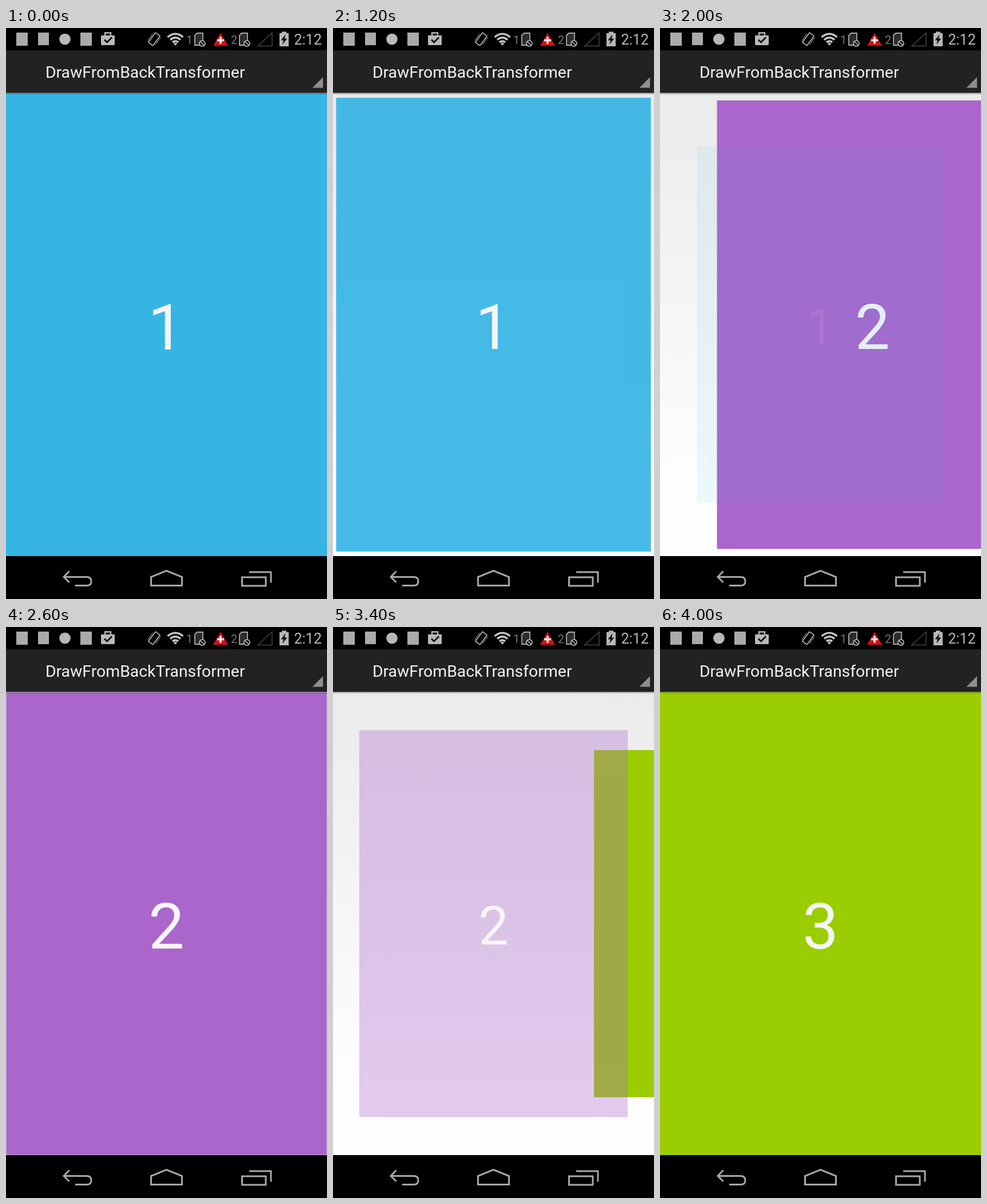
Recreate the animation shown at these times as an HTML page. Size 561 px wide and 998 px high, loop 4200 ms.

```html
<!DOCTYPE html>
<html lang="en">
<head>
<meta charset="utf-8">
<title>DrawFromBackTransformer</title>
<style>
  html, body { margin: 0; width: 100%; height: 100%; overflow: hidden; background: #000; }
  svg { display: block; width: 561px; height: 998px; font-family: Roboto, sans-serif; }
  .page text { font-size: 112px; fill: #f5f5f5; text-anchor: middle; }
  .line { fill: none; stroke: #a8a8a8; stroke-width: 3; }
  .icons { fill: #b8b8b8; }
  .dim { fill: #777; font-size: 20px; }
</style>
</head>
<body>
<svg viewBox="0 0 561 998">
  <defs>
    <linearGradient id="backdrop" x1="0" y1="0" x2="0" y2="1">
      <stop offset="0" stop-color="#ebebeb"/>
      <stop offset=".85" stop-color="#fefefe"/>
    </linearGradient>
    <linearGradient id="shadow" x1="0" y1="0" x2="0" y2="1">
      <stop offset="0" stop-opacity=".3"/>
      <stop offset="1" stop-opacity="0"/>
    </linearGradient>
    <g id="sim">
      <path d="M1 5 5 1H15V22H1Z" fill="#2c2c2c" stroke="#aaa" stroke-width="1.800"/>
      <circle cx="14" cy="19" r="5" fill="#000" stroke="#bbb" stroke-width="1.700"/>
      <path d="M10.500 15.500 17.500 22.500" stroke="#bbb" stroke-width="1.700"/>
    </g>
  </defs>

  <rect y="113" width="561" height="811" fill="url(#backdrop)"/>

  <!-- Later pages lie behind earlier ones. -->
  <g class="page"><rect y="114" width="561" height="809" fill="#9acd02"/><text x="280.5" y="562">3</text></g>
  <g class="page"><rect y="114" width="561" height="809" fill="#aa66cb"/><text x="280.5" y="562">2</text></g>
  <g class="page"><rect y="114" width="561" height="809" fill="#36b5e5"/><text x="279.5" y="562">1</text></g>

  <rect y="113.500" width="561" height="3.500" fill="url(#shadow)"/>

  <!-- Action bar -->
  <rect width="561" height="40" fill="#000"/>
  <rect y="39" width="561" height="74.500" fill="#222"/>
  <text x="68.900" y="87.300" font-size="28.400" fill="#f3f3f3">DrawFromBackTransformer</text>
  <path d="M554 86V104.500H535.500Z" fill="#8f8f8f"/>

  <!-- Status bar -->
  <g class="icons">
    <rect x="18" y="8" width="20" height="23" fill="#aaa"/>
    <rect x="56" y="8" width="19" height="22" fill="#aaa"/>
    <circle cx="103" cy="19.500" r="9.800"/>
    <rect x="130" y="8" width="20" height="23" fill="#aaa"/>
    <path d="M166 13H190V28Q190 30 188 30H168Q166 30 166 28Z"/>
    <path d="M173 13V8.500H183V13" fill="none" stroke="#b8b8b8" stroke-width="2.400"/>
    <path d="M172 20.500 176.500 25 185 16.500" fill="none" stroke="#000" stroke-width="2.600"/>

    <g transform="translate(259 19.500) rotate(36)" fill="none" stroke="#b8b8b8" stroke-width="1.700">
      <rect x="-5" y="-10.500" width="10" height="21" rx="1"/>
      <path d="M-7.500 -6V9M7.500 -9V6" stroke="#777" stroke-width="1.300"/>
    </g>

    <g fill="none" stroke="#c4c4c4" stroke-width="3.600">
      <path d="M282.500 16Q296 4.500 309.500 16"/>
      <path d="M287 20.500Q296 13 305 20.500"/>
      <path d="M291 25Q296 21 301 25"/>
    </g>
    <path d="M292.800 27Q296 24.500 299.200 27L296 31Z"/>

    <text class="dim" x="315" y="28">1</text>
    <use href="#sim" x="329" y="8"/>
    <path d="M375 8.500 388 31H362Z" fill="#cf1218"/>
    <path d="M375 15.500V27.500M369 21.500H381" stroke="#f4eaea" stroke-width="3.600"/>
    <text class="dim" x="393" y="28">2</text>
    <use href="#sim" x="407" y="8"/>
    <path d="M465 8.500V31.500H440Z" fill="none" stroke="#444" stroke-width="1.500"/>

    <path d="M482 6.500H490V9H494V32H478V9H482Z"/>
    <path d="M488.500 11 480.500 21.500H485L483 29 491.500 18.500H487Z" fill="#111"/>
    <text x="503.500" y="29" font-size="25">2:12</text>
  </g>

  <!-- Navigation bar -->
  <rect y="923" width="561" height="75" fill="#000"/>
  <g class="line">
    <path d="M110.500 949.500 101 959.500 110.500 969M101 959.500H141Q149 959.500 149 967T141 974.500H121"/>
    <path d="M253.500 974.500V959.500L280.500 948.500 307.500 959.500V974.500Z"/>
    <path d="M412.500 960H454V975H412.500ZM425 951H463V969.500"/>
  </g>
</svg>

<script>
  const LOOP = 4200, STEP = 100;
  const WIDTH = 561, CENTER_X = 280.5, CENTER_Y = 518.5, MIN_SCALE = 0.75;

  // Scroll offset in pages at given times: two swipes.
  const swipe = [
    [0, 0], [950, 0], [1200, .078], [1600, .491], [2000, .919], [2350, 1],
    [2500, 1], [2600, 1.005], [2750, 1.005], [2900, 1.09], [3400, 1.656],
    [3600, 1.875], [3900, 1.996], [4000, 2], [LOOP, 2]
  ];
  const pages = [...document.querySelectorAll('.page')].reverse();

  const rise = i => swipe[i + 1]
    ? (swipe[i + 1][1] - swipe[i][1]) / (swipe[i + 1][0] - swipe[i][0])
    : 0;

  // Harmonic mean keeps the curve monotone.
  const slope = i => {
    const a = i ? rise(i - 1) : 0, b = rise(i);
    return a && b ? 2 * a * b / (a + b) : 0;
  };

  function offsetAt(t) {
    const i = swipe.findIndex(([end]) => t < end) - 1;
    const [t0, p0] = swipe[i], [t1, p1] = swipe[i + 1];
    const d = t1 - t0, u = (t - t0) / d, v = 1 - u;
    return p0 * v * v * (1 + 2 * u) + p1 * u * u * (3 - 2 * u)
      + d * u * v * (slope(i) * v - slope(i + 1) * u);
  }

  function place(page, pos) {
    const leaving = pos <= 0;
    const alpha = leaving ? Math.max(0, 1 + pos) : pos <= .5 ? 1 : 0;
    const grow = leaving ? .25 * (1 + pos) : Math.min(.25, Math.max(0, .3 - pos));
    const scale = MIN_SCALE + grow;
    const x = CENTER_X + (leaving ? 0 : 2 * pos * WIDTH);
    page.setAttribute('opacity', alpha);
    page.setAttribute('transform',
      `translate(${x} ${CENTER_Y}) scale(${scale}) translate(${-CENTER_X} ${-CENTER_Y})`);
  }

  function draw() {
    const t = Math.floor(performance.now() % LOOP / STEP) * STEP;
    const offset = offsetAt(t);
    pages.forEach((page, i) => place(page, i - offset));
    requestAnimationFrame(draw);
  }
  draw();
</script>
</body>
</html>
```
